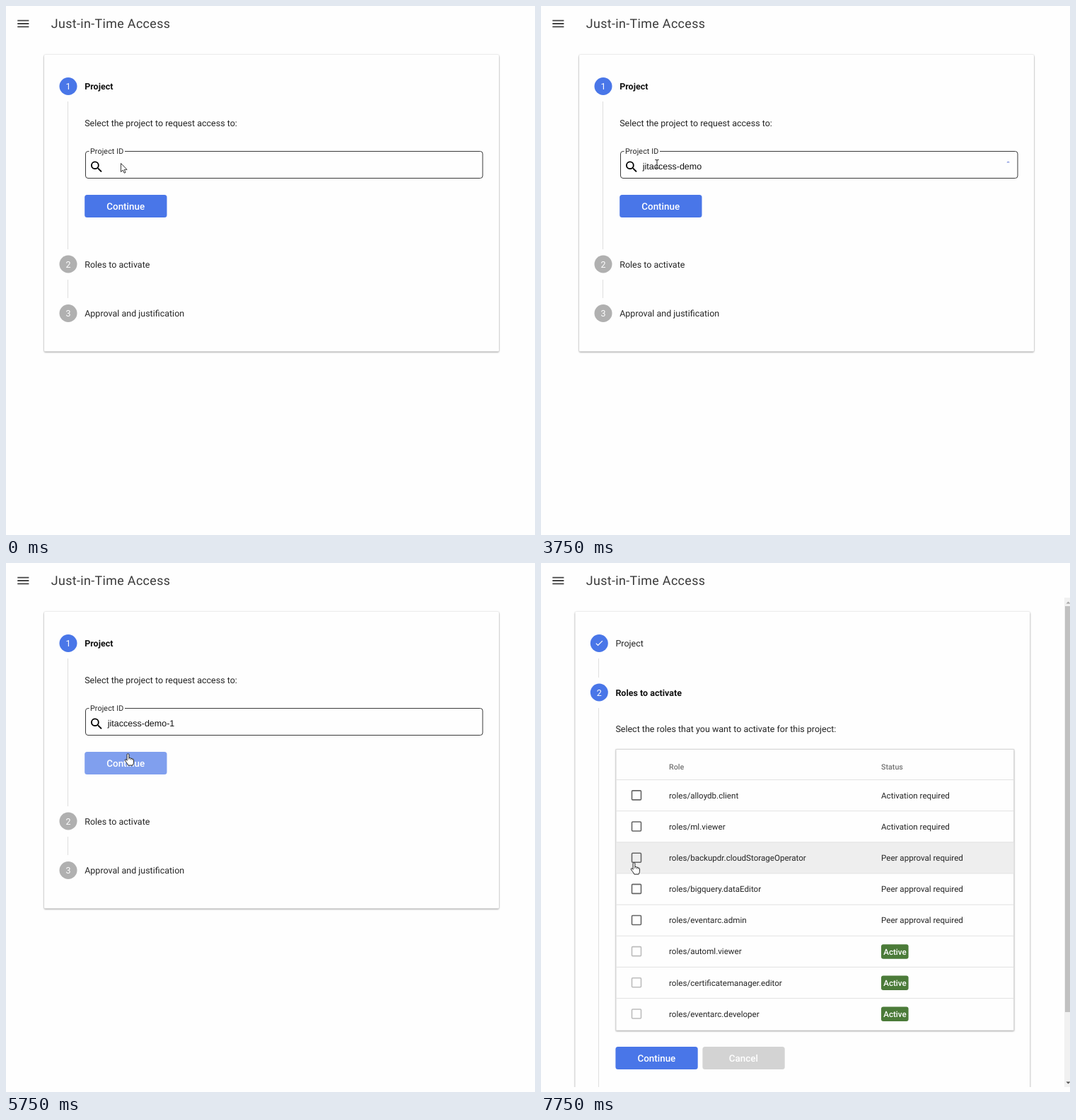
Recreate the animation shown at these times as an HTML page. Size 748 by 748 pixels, loop 8000 ms.

```html
<!DOCTYPE html>
<html lang="en">
<head>
<meta charset="utf-8">
<title>Just-in-Time Access</title>
<style>
html, body { margin: 0; width: 100%; height: 100%; overflow: hidden; background: #fefefe; }
svg { display: block; width: 748px; height: 748px; font-family: Roboto, sans-serif; text-rendering: geometricPrecision; }
text { fill: #252525; white-space: pre; }
.b { font-weight: 500; }
.act { font-weight: 600; fill: #111; }
.w { fill: #fff; }
.mid { text-anchor: middle; }
.head { font-weight: 500; fill: #757575; }
.input { font-family: "Liberation Sans", Arial, sans-serif; fill: #111; }
.card { fill: #fefefe; filter: drop-shadow(0 1px 1px rgba(0,0,0,.34)) drop-shadow(0 0 1px rgba(0,0,0,.14)); }
</style>
</head>
<body>
<svg id="stage" viewBox="0 0 748 748"></svg>
<script>
const stage = document.getElementById('stage');
const BLUE = '#4976e8', GREY = '#b0b0b0', LINE = '#dfdfdf';

const text = (x, y, s, size = 12.5, cls = '') =>
  `<text x="${x}" y="${y}" font-size="${size}" class="${cls}">${s}</text>`;
const rect = (x, y, w, h, fill, r = 0, extra = '') =>
  `<rect x="${x}" y="${y}" width="${w}" height="${h}" rx="${r}" fill="${fill}" ${extra}/>`;
const path = (d, fill, extra = '') => `<path d="${d}" fill="${fill}" ${extra}/>`;
const icon = (x, y, d, fill, k = .893) => path(d, fill, `transform="translate(${x} ${y}) scale(${k})"`);
const button = (x, y, label, fill) =>
  rect(x, y, 116.3, 32, fill, 3.5) + text(x + 58, y + 20.6, label, 13.4, 'b w mid');
const badge = (x, y, n, fill) =>
  `<circle cx="${x}" cy="${y}" r="12.5" fill="${fill}"/>` + text(x, y + 4.5, n, 12.5, 'w mid');
const rail = (x, y, h) => rect(x, y, 1, h, LINE);

const MENU = 'M3 18h18v-2H3zM3 13h18v-2H3zM3 6v2h18V6z';
const CHECK = 'M9 16.2 4.8 12l-1.4 1.4L9 19 21 7l-1.4-1.4z';
const SEARCH = 'M15.5 14h-.79l-.28-.27A6.5 6.5 0 1 0 13.73 14.43l.27.28v.79l5 4.99L20.49 19zM9.5 14a4.5 4.5 0 1 1 0-9 4.5 4.5 0 0 1 0 9z';
const CURSORS = {
  arrow: path('M0 0V12L2.8 9.5 4.7 13.7 6.5 12.9 4.8 8.8H8.6Z', '#fff', 'stroke="#222" stroke-width=".9"'),
  beam: path('M-2.6 .5H-1Q0 .5 0 1.5 0 .5 1 .5H2.6M0 1.5V11M-2.6 12H-1Q0 12 0 11 0 12 1 12H2.6', 'none', 'stroke="#222"'),
  hand: path('M-1.4 9.8V1.6a1.4 1.4 0 0 1 2.8 0V6.2q2.4-.8 2.6.7 2.1-.6 2.3.8 1.7-.3 1.7 1.3V12q0 2.2-1.4 4.6H.4Q-1.6 13-3.8 10.4-4.9 8.4-3.4 8.2q1 0 2 1.6Z',
    '#fff', 'stroke="#222"') + path('M1.4 6V8.6M4 6.8V9M6.3 7.6V9.4', 'none', 'stroke="#222" stroke-width=".8"')
};

// Each entry holds from its step (250 ms each) until the next one.
const TYPED = [[0, ''], [6, 'ji'], [7, 'jit'], [8, 'jitac'], [9, 'jitacce'], [10, 'jitaccess'],
  [11, 'jitaccess-d'], [12, 'jitaccess-demo'], [21, 'jitaccess-demo-1']];
const POINTER = [[0, 'arrow', 162.5, 222.5], [1, 'beam', 164, 217], [17, 'beam', 168, 230],
  [18, 'hand', 174.5, 250], [19, 'hand', 174.5, 252], [22, 'hand', 172.5, 269.5],
  [28, 'hand', 155, 321], [29, 'hand', 134, 412], [30, 'hand', 132, 420], [31, 'hand', 131.5, 423.5]];
const ROLES = ['alloydb.client', 'ml.viewer', 'backupdr.cloudStorageOperator', 'bigquery.dataEditor',
  'eventarc.admin', 'automl.viewer', 'certificatemanager.editor', 'eventarc.developer'];
const at = (list, step) => list.filter(e => e[0] <= step).pop();
const between = (n, a, b) => n >= a && n < b;

const caretOn = n => between(n, 2, 4) || between(n, 6, 14) || between(n, 16, 18) || between(n, 20, 23);

function dropdown(hover) {
  const first = hover ? rect(111, 244.5, 528, 25.8, '#eee') : '';
  return rect(112, 244, 526.5, 80, '#fefefe', 0, 'class="card"') + first +
    [1, 3, 2].map((id, i) => text(hover && !i ? 117 : 118, 261.2 + i * 26.3, 'jitaccess-demo-' + id)).join('');
}

function projectPage(n) {
  let s = rect(54, 69, 643, 419.5, '#fefefe', 1.5, 'class="card"');
  s += badge(88, 113.5, 1, BLUE) + text(111.2, 118, 'Project', 12.5, 'act') + rail(87, 135, 209);
  s += text(111.2, 169.8, 'Select the project to request access to:');
  s += path('M117.5 205.5H116a3.5 3.5 0 0 0-3.5 3.5V240a3.5 3.5 0 0 0 3.5 3.5H670.5a3.5 3.5 0 0 0 3.5-3.5V209a3.5 3.5 0 0 0-3.5-3.5H168',
    'none', 'stroke="#3a3a3a"');
  s += text(119, 209.2, 'Project ID', 10.72, '" letter-spacing=".1') + icon(117.4, 216.8, SEARCH, '#000');
  s += text(143.8, 231.2, at(TYPED, n)[1], 12.5, 'input" id="typed');
  if (between(n, 18, 21)) {
    s += path('M144 233' + 'q1 -2 2 0t2 0'.repeat(12), 'none', 'stroke="#e0332c" stroke-width=".9"');
  }
  if (n === 15) s += path('M659 221.3q1.5-1.6 3.2 0', 'none', 'stroke="#6a7fd8" stroke-width="1.2"');
  s += button(111.2, 267, 'Continue', n === 23 ? '#809fee' : n === 24 ? '#6489eb' : BLUE);
  if (between(n, 16, 21)) s += dropdown(n >= 18);
  s += badge(88, 365, 2, GREY) + text(111.2, 369.8, 'Roles to activate') + rail(87, 387, 26);
  return s + badge(88, 434.5, 3, GREY) + text(111.2, 439, 'Approval and justification');
}

function roleRow(name, i, hover) {
  const y = 306.5 + i * 44.15, mid = y + 22;
  let s = hover ? rect(106.5, y, 562, 44, '#eee') : '';
  s += rect(106.5, y - .5, 562, 1, '#e2e2e2');
  s += rect(128.5, mid - 6.6, 13, 13, 'none', 1.2, `stroke="${i < 5 ? '#666' : '#bdbdbd'}" stroke-width="1.6"`);
  s += text(181, mid + 4.1, 'roles/' + name, 11.6);
  if (i > 4) return s + rect(481, mid - 10, 38.6, 20.5, '#4b7b39', 3) + text(484.2, mid + 4.3, 'Active', 11.6, 'b w');
  return s + text(481, mid + 4.1, i < 2 ? 'Activation required' : 'Peer approval required', 11.6);
}

function rolesPage(n) {
  let s = rect(48.3, 69, 643, 800, '#fefefe', 1.5, 'class="card"');
  s += badge(82.3, 113.5, '', BLUE) + icon(75.5, 106.5, CHECK, '#fff', .56);
  s += text(105.4, 118, 'Project') + rail(81, 135, 27);
  s += badge(82.3, 183, 2, BLUE) + text(105.4, 187.8, 'Roles to activate', 12.5, 'act') + rail(81, 205, 540);
  s += text(105.4, 239, 'Select the roles that you want to activate for this project:');
  s += rect(106, 263.5, 562.7, 397.5, '#fefefe', 0, 'class="card"');
  s += rect(106, 263.5, 562.7, 397.5, 'none', 0, 'stroke="#d8d8d8"');
  s += text(181, 291.8, 'Role', 10.72, 'head') + text(481, 291.8, 'Status', 10.72, 'head');
  s += ROLES.map((name, i) => roleRow(name, i, n >= 29 && i === 2)).join('');
  s += button(105.4, 684, 'Continue', BLUE) + button(228.4, 684, 'Cancel', '#d3d3d3');
  s += rect(0, 741, 748, 7, '#fefefe');
  s += rect(740, 49, 8, 692, '#f1f1f1') + rect(741, 61, 7, 574, '#c1c1c1');
  return s + path('M742.5 57.5 745.5 54.5 748.5 57.5Z', '#a3a3a3') + path('M742.5 733.5 745.5 736.5 748.5 733.5Z', '#505050');
}

function draw(n) {
  const [, kind, x, y] = at(POINTER, n);
  stage.innerHTML = (n < 25 ? projectPage(n) : rolesPage(n)) +
    icon(13.6, 14.3, MENU, '#424242') +
    text(63.8, 30.8, 'Just-in-Time Access', 17.86, '" letter-spacing=".36" fill-opacity=".9') +
    '<g id="caret"></g>' + `<g transform="translate(${x} ${y})">${CURSORS[kind]}</g>`;
  if (n < 25 && caretOn(n)) {
    const w = document.getElementById('typed').getComputedTextLength();
    document.getElementById('caret').innerHTML = rect(Math.round(143.8 + w), 220, 1, 14, '#111');
  }
}

let shown = -1;
function tick() {
  const step = Math.floor(performance.now() % 8000 / 250);
  if (step !== shown) draw(shown = step);
  requestAnimationFrame(tick);
}
tick();
</script>
</body>
</html>
```
